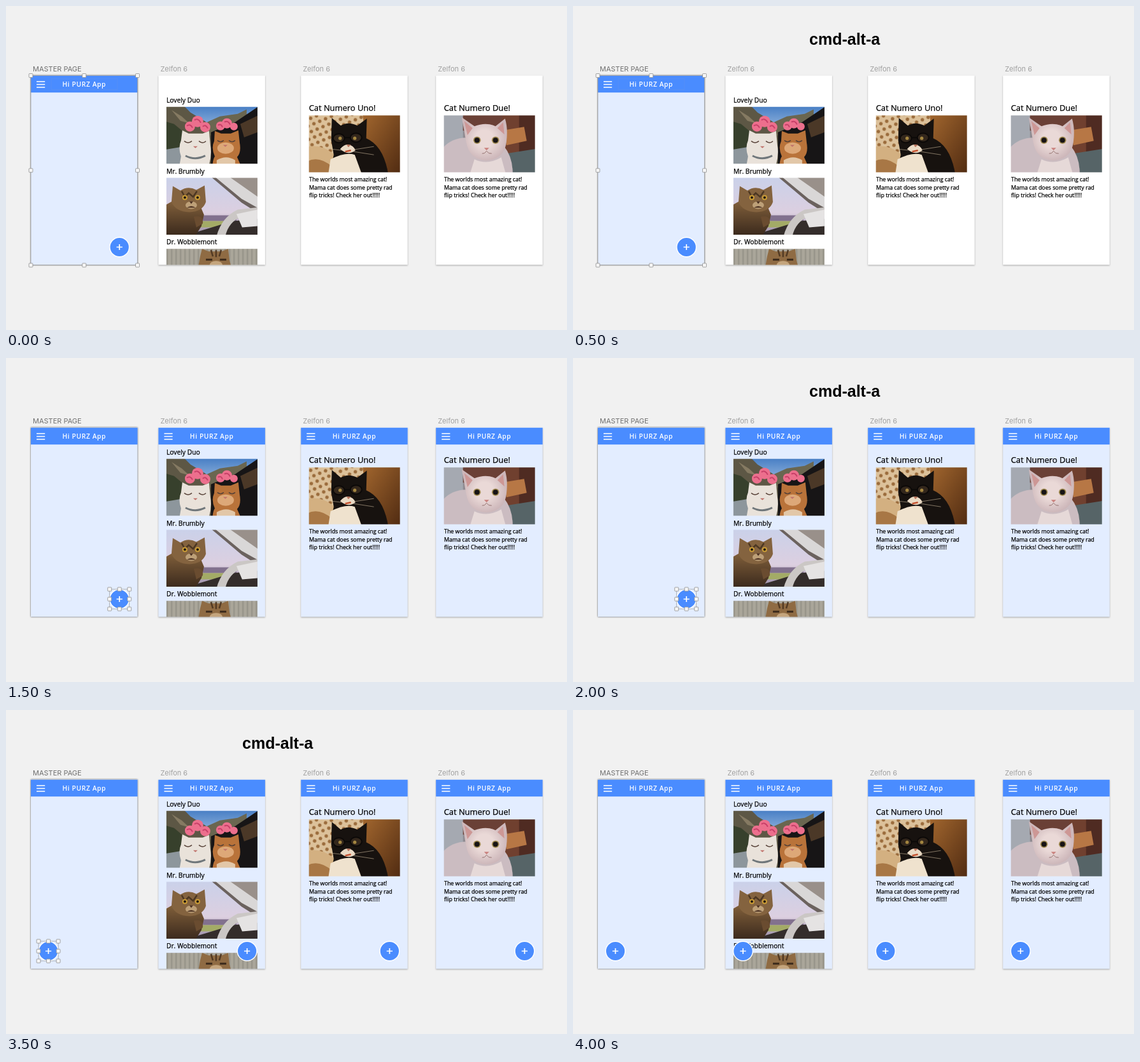
Animation of 881x510 px, one loop 6000 ms. Source, as an HTML page:

```html
<!DOCTYPE html>
<html lang="en">
<head>
<meta charset="utf-8">
<title>Master page</title>
<style>
  html, body { margin: 0; width: 100%; height: 100%; overflow: hidden; background: #f1f1f1; }
  svg { display: block; }
  text { font-family: "Open Sans", sans-serif; font-size: 10.3px; }
  .board > text, .content > text, .copy { stroke: #000; stroke-width: .25; }
  .board > .label { font: 11px Inter, sans-serif; fill: #a0a0a0; stroke: none; }
  .page { fill: #fff; filter: drop-shadow(0 1px 1.3px rgba(0, 0, 0, .32)); }
  .linked .page { fill: #e3edff; }
  .active .label { fill: #707070; }
  .active .page { filter: drop-shadow(0 .8px 1.3px rgba(0, 0, 0, .75)); }
  .heading { font-size: 12.9px; }
  .copy { font-size: 8.85px; }
  .title { font-weight: 600; letter-spacing: .6px; fill: #fff; text-anchor: middle; }
  .grips rect { fill: #f6f6f6; stroke: #8e8e8e; stroke-width: .8; }
  .grips .frame { fill: none; stroke: #999; stroke-width: .7; }
  .soft { filter: blur(.5px); }
  #shortcut { font: bold 25px "Liberation Sans", Arial, sans-serif; }
</style>
</head>
<body>
<svg width="881" height="510" viewBox="0 0 881 510">
  <defs>
    <rect id="page" y=".4" width="167.5" height="298"/>
    <clipPath id="pageClip"><use href="#page"/></clipPath>
    <g id="bar">
      <rect y=".8" width="167.5" height="26.4" fill="#4a8cff"/>
      <path d="M9 10H22.2M9 14.5H22.2M9 19H22.2" stroke="#fff" stroke-width="1.3"/>
      <text class="title" x="83.8" y="18">Hi PURZ App</text>
    </g>
    <g id="plus">
      <circle r="15.3" fill="#4a8cff" stroke="#fff" stroke-width="1.4"/>
      <path d="M-4.6 0H4.6M0 -4.6V4.6" stroke="#fff" stroke-width="1.7"/>
    </g>
    <linearGradient id="sky" x2="0" y2="1">
      <stop stop-color="#3f78c2"/><stop offset=".5" stop-color="#a9c5e4"/>
    </linearGradient>
    <linearGradient id="haze" x2="0" y2="1">
      <stop stop-color="#c9d1ea"/><stop offset=".6" stop-color="#dccfe0"/><stop offset="1" stop-color="#8f829b"/>
    </linearGradient>
    <linearGradient id="fur" x2="0" y2="1">
      <stop stop-color="#84623c"/><stop offset="1" stop-color="#35251a"/>
    </linearGradient>
    <radialGradient id="paleFur">
      <stop offset=".4" stop-color="#ead9d7"/><stop offset="1" stop-color="#cdb7ba"/>
    </radialGradient>
    <linearGradient id="wood" y2="1">
      <stop stop-color="#a4682f"/><stop offset="1" stop-color="#4c2810"/>
    </linearGradient>
    <pattern id="dots" width="15" height="13" patternUnits="userSpaceOnUse" patternTransform="rotate(18)">
      <rect width="15" height="13" fill="#dcc19a"/>
      <circle cx="4" cy="3.5" r="2.7" fill="#9b6c3c"/><circle cx="11.5" cy="10" r="2.7" fill="#9b6c3c"/>
    </pattern>
    <pattern id="slats" width="7" height="30" patternUnits="userSpaceOnUse">
      <rect width="7" height="30" fill="#aaa69a"/><rect width="2.5" height="30" fill="#98958a"/>
    </pattern>
  </defs>

  <text id="shortcut" x="371" y="61">cmd-alt-a</text>

  <g class="board linked" transform="translate(39 109)">
    <text class="label" x="3" y="-6.5">MASTER PAGE</text>
    <use href="#page" class="page"/>
    <use href="#bar"/>
    <g class="button"><use href="#plus"/><g class="grips" id="buttonGrips"></g></g>
    <g id="pageSelection">
      <rect x="32" y="5.5" width="104" height="17" fill="none" stroke="#5b91f2" stroke-width=".7"/>
      <g class="grips" id="pageGrips"></g>
    </g>
  </g>

  <g class="board" transform="translate(239.4 109)">
    <text class="label" x="3" y="-6.5">Zelfon 6</text>
    <use href="#page" class="page"/>
    <g class="content" clip-path="url(#pageClip)">
      <text x="12.5" y="43">Lovely Duo</text>
      <svg x="12.5" y="49.7" width="143" height="89.5"><g class="soft">
        <rect x="-5" y="-5" width="153" height="100" fill="url(#sky)"/>
        <path d="M-5 -5H24L38 9L58 21L72 30V95H-5Z" fill="#5d5745"/>
        <path d="M-5 22L12 27L30 42V72H-5Z" fill="#37402c"/>
        <path d="M8 5L24 15L36 26L22 22Z" fill="#857a62"/>
        <path d="M-5 68L30 62V95H-5Z" fill="#8d969c"/>
        <path d="M64 24L84 15L112 11L126 4V45H64Z" fill="#6a6650"/>
        <path d="M70 40L108 24L148 -3V95H70Z" fill="#171516"/>
        <path d="M116 27L143 14V40L122 48Z" fill="#4b3827"/>
        <path d="M20 95L23 78Q18 64 23 53L25 37L35 42H57L67 38L69 60Q72 76 66 95Z" fill="#e9e2da"/>
        <path d="M72 95Q73 82 76 78Q70 65 75 54L76 38L86 42H101L113 37L115 56Q118 72 111 79L118 95Z" fill="#b9733a"/>
        <ellipse cx="93" cy="65" rx="13" ry="9" fill="#dda878"/>
        <path d="M79 84Q94 75 108 84V95H79Z" fill="#e2c7a8"/>
        <path d="M28 54Q34 59 40 54M51 54Q57 59 62 54M80 53Q85 57 90 53M98 53Q103 57 108 53" fill="none" stroke="#574137" stroke-width="1.5"/>
        <path d="M42 62H49L45.5 65ZM89 60H96L92.5 63Z" fill="#c0726b"/>
        <path d="M30 77Q45 85 61 77" fill="none" stroke="#70777b" stroke-width="3"/>
        <g fill="#ec6f8d">
          <circle cx="37" cy="31" r="8"/><circle cx="49" cy="23" r="9"/><circle cx="61" cy="32" r="8"/>
          <circle cx="85" cy="30" r="7"/><circle cx="95" cy="26" r="8"/><circle cx="106" cy="31" r="6"/>
        </g>
        <path d="M32 30Q38 26 41 33M44 21Q50 17 54 25M57 31Q62 27 65 34M81 29Q86 26 88 32M91 24Q97 21 100 28" fill="none" stroke="#c83f68" stroke-width="2"/>
      </g></svg>

      <text x="12.5" y="154.5">Mr. Brumbly</text>
      <svg x="12.5" y="161.5" width="143" height="89.5"><g class="soft">
        <rect x="-5" y="-5" width="153" height="100" fill="url(#haze)"/>
        <path d="M48 59H110V68H48Z" fill="#82718e"/>
        <path d="M48 68H105V78H48Z" fill="#a3ab66"/>
        <path d="M66 -5H148V58L118 39Z" fill="#6b625e"/>
        <path d="M72 -5H148V50L118 33Z" fill="#d9d7d7"/>
        <path d="M94 -5H148V33Z" fill="#99908a"/>
        <path d="M45 86L104 68L148 64V95H45Z" fill="#342d2b"/>
        <path d="M78 95Q85 63 112 50L148 46V58L118 61Q96 70 92 95Z" fill="#cbc7c5"/>
        <path d="M110 57L143 50V76L119 78Z" fill="#e5e3e3"/>
        <path d="M-5 95V45L14 34H49L59 58L55 76L43 95Z" fill="url(#fur)"/>
        <path d="M8 38L10 13L22 20Q34 12 47 19L60 12L62 38Q57 53 36 54Q14 53 8 38Z" fill="#84633f"/>
        <path d="M24 21L29 30L35 24L42 30L48 21" fill="none" stroke="#4c3722" stroke-width="2.5"/>
        <g fill="#cb9d36"><circle cx="29" cy="31" r="4"/><circle cx="49" cy="31" r="4"/></g>
        <g fill="#21170f"><circle cx="29" cy="31" r="2"/><circle cx="49" cy="31" r="2"/></g>
        <ellipse cx="39" cy="43" rx="9" ry="6" fill="#bda078"/>
        <path d="M36 37H42L39 41ZM32 47Q39 42 46 47" fill="#4b3021"/>
        <path d="M43 61Q59 58 57 72L47 78Z" fill="#6a4c30"/>
      </g></svg>

      <text x="12.5" y="266">Dr. Wobblemont</text>
      <svg x="12.5" y="273.2" width="143" height="89.5"><g class="soft">
        <rect x="-5" y="-5" width="153" height="100" fill="url(#slats)"/>
        <path d="M48 40L53 12L56 0L66 4H87L97 0L99 18L105 40Z" fill="#8f6b43"/>
        <path d="M70 2L73 12M78 2V13M86 2L83 12" stroke="#523a24" stroke-width="2.5"/>
        <path d="M62 17H72M84 17H94" stroke="#3b2a1b" stroke-width="3"/>
        <ellipse cx="78" cy="25" rx="10" ry="6" fill="#c4a57d"/>
      </g></svg>
    </g>
    <use href="#bar" class="applied"/>
    <use href="#plus" class="button copyButton"/>
  </g>

  <g class="board" transform="translate(463.2 109)">
    <text class="label" x="3" y="-6.5">Zelfon 6</text>
    <use href="#page" class="page"/>
    <text class="heading" x="12.5" y="56">Cat Numero Uno!</text>
    <svg x="12.5" y="63.2" width="143" height="89.5"><g class="soft">
      <rect x="-5" y="-5" width="153" height="100" fill="url(#dots)"/>
      <path d="M84 -5H148V95H95Z" fill="url(#wood)"/>
      <path d="M-5 50Q22 43 43 65L62 95H-5Z" fill="#d3b081"/>
      <path d="M-5 74Q20 58 50 95H-5Z" fill="#a87745"/>
      <path d="M32 95L39 62L35 39L36 4L50 16Q62 9 76 16L91 5L90 36Q118 48 125 95Z" fill="#17120f"/>
      <path d="M34 69Q58 57 72 62L84 95H30Z" fill="#efe2ce"/>
      <path d="M49 53Q56 45 62 46Q70 47 73 55Q62 64 49 53Z" fill="#eadac5"/>
      <path d="M59 46H66L62 50Z" fill="#b66f59"/>
      <path d="M57 57L66 55" stroke="#c4522f" stroke-width="2.5"/>
      <g fill="#33271c" stroke="#0c0908" stroke-width="2">
        <ellipse cx="47" cy="36" rx="9" ry="7"/><ellipse cx="74" cy="35" rx="9" ry="7"/>
      </g>
      <path d="M56 35H65" stroke="#0c0908" stroke-width="2"/>
      <g fill="#a48640"><circle cx="49" cy="36" r="2.6"/><circle cx="72" cy="36" r="2.6"/></g>
      <path d="M70 54L102 49M70 57L102 62M51 55L27 52" stroke="#cbb99d" stroke-width=".6"/>
    </g></svg>
    <g class="copyText"></g>
    <use href="#bar" class="applied"/>
    <use href="#plus" class="button copyButton"/>
  </g>

  <g class="board" transform="translate(675.2 109)">
    <text class="label" x="3" y="-6.5">Zelfon 6</text>
    <use href="#page" class="page"/>
    <text class="heading" x="12.5" y="56">Cat Numero Due!</text>
    <svg x="12.5" y="63.2" width="143" height="89.5"><g class="soft">
      <rect x="-5" y="-5" width="153" height="100" fill="#8f8b91"/>
      <path d="M-5 -5H30V60H-5Z" fill="#a5a9b1"/>
      <path d="M30 -5H148V24H30Z" fill="#6a4036"/>
      <path d="M92 -5H148V62H92Z" fill="#70402f"/>
      <path d="M118 -5H148V66H118Z" fill="#4f2b22"/>
      <path d="M96 23L126 18L130 40L98 47Z" fill="#b77745"/>
      <path d="M98 60L148 52V95H98Z" fill="#566467"/>
      <path d="M-5 95V55Q10 35 36 35L94 48Q109 66 108 95Z" fill="#cbbcc1"/>
      <path d="M28 3L48 17Q66 10 81 17L96 5Q101 21 98 43Q94 69 67 71Q40 70 35 42Z" fill="url(#paleFur)"/>
      <path d="M32 9L45 20L37 31ZM93 11L84 20L95 30Z" fill="#cd9795"/>
      <path d="M48 69Q68 79 90 66L98 95H40Z" fill="#e6d9d8"/>
      <g fill="#9f8950"><circle cx="52" cy="39" r="5.8"/><circle cx="81" cy="39" r="5.8"/></g>
      <g fill="#171314"><circle cx="52" cy="39" r="4"/><circle cx="81" cy="39" r="4"/></g>
      <path d="M63 51H71L67 55Z" fill="#c9817d"/>
      <path d="M60 60Q64 61 67 56Q70 61 75 60" fill="none" stroke="#93716e" stroke-width="1"/>
    </g></svg>
    <g class="copyText"></g>
    <use href="#bar" class="applied"/>
    <use href="#plus" class="button copyButton"/>
  </g>
</svg>
<script>
  const $ = id => document.getElementById(id);
  const all = selector => [...document.querySelectorAll(selector)];
  const show = (el, on) => { el.style.display = on ? "" : "none"; };

  const lines = ["The worlds most amazing cat!", "Mama cat does some pretty rad", "flip tricks! Check her out!!!!!"];
  for (const g of all(".copyText"))
    g.innerHTML = lines.map((line, i) =>
      `<text class="copy" x="12.8" y="${167.4 + i * 12.5}">${line}</text>`).join("");

  function addGrips(g, x, y, w, h) {
    let html = `<rect class="frame" x="${x}" y="${y}" width="${w}" height="${h}"/>`;
    for (const i of [0, .5, 1])
      for (const j of [0, .5, 1])
        if (i !== .5 || j !== .5)
          html += `<rect x="${x + w * i - 3}" y="${y + h * j - 3}" width="6" height="6" rx=".8"/>`;
    g.innerHTML = html;
  }
  addGrips($("pageGrips"), 0, .5, 167.5, 298.5);
  addGrips($("buttonGrips"), -15.5, -15.5, 31, 31);

  const boards = all(".board"), buttons = all(".button");
  const applied = all(".applied"), copies = all(".copyButton");

  function draw() {
    const step = Math.floor(performance.now() % 6000 / 500);
    const linked = step >= 2;
    const active = step === 2 ? 3 : 0;
    show($("shortcut"), [1, 4, 7].includes(step));
    show($("pageSelection"), !linked);
    show($("buttonGrips"), [3, 4, 6, 7].includes(step));
    boards.forEach((board, i) => {
      board.classList.toggle("active", i === active);
      board.classList.toggle("linked", i === 0 || linked);
    });
    applied.forEach(bar => show(bar, linked));
    copies.forEach(button => show(button, step >= 5));
    buttons.forEach((button, i) => {
      const moved = step >= (i === 0 ? 6 : 8);
      button.setAttribute("transform", `translate(${moved ? 27.6 : 139.2} 270.5)`);
    });
    requestAnimationFrame(draw);
  }
  draw();
</script>
</body>
</html>
```
